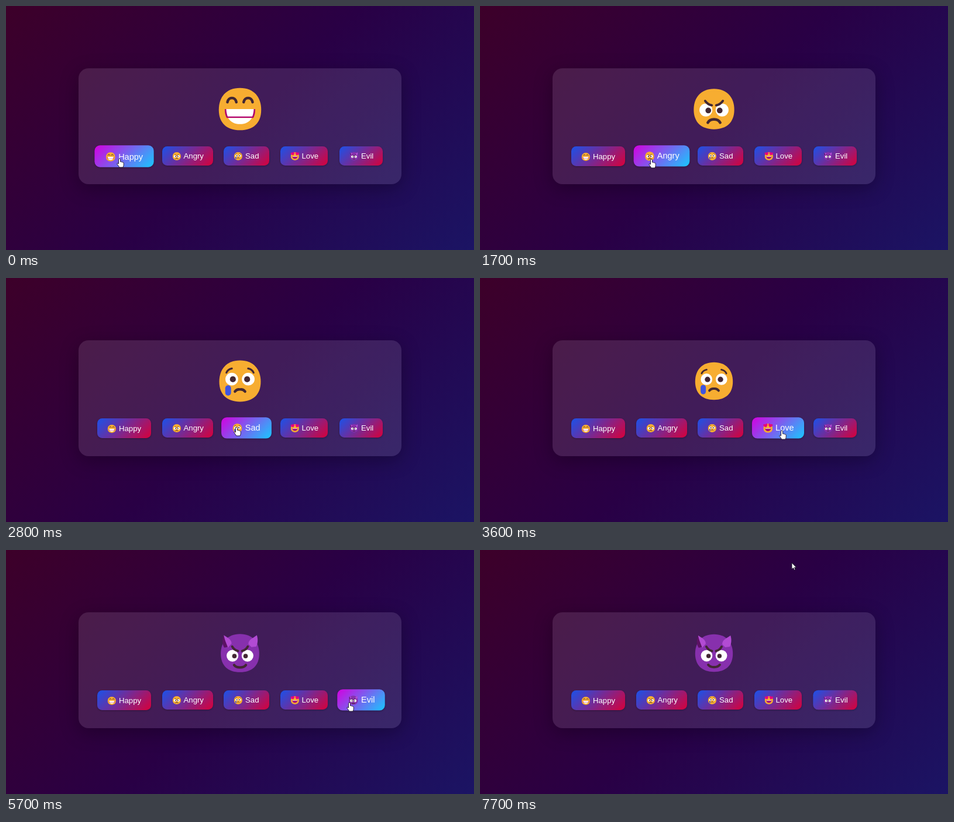
Recreate the animation shown at these times as an HTML page. Size 800 by 419 pixels, loop 7.8 s.

```html
<!DOCTYPE html>
<html lang="en">
<head>
<meta charset="utf-8">
<title>Mood picker</title>
<style>
html, body { margin: 0; width: 100%; height: 100%; overflow: hidden; }
body { position: relative; background: linear-gradient(135deg, #3d0029, #290045 50%, #1b1464); }
.panel { position: absolute; left: 124px; top: 106.5px; width: 552px; height: 199.5px; border-radius: 17px;
  background: rgba(255,255,255,.11); box-shadow: 0 8px 32px rgba(0,0,0,.28); }
.btn { position: absolute; top: 240.5px; height: 33.5px; border-radius: 8.5px;
  background: linear-gradient(135deg, #1a52ea, #d8003a); box-shadow: 0 1px 3px rgba(0,0,0,.3);
  color: #fff; font: 13.2px/33.5px "Liberation Sans", Arial, sans-serif; }
.btn.hot { background: linear-gradient(135deg, #d400e0, #18c8ff); }
.btn svg { position: absolute; left: 17.1px; top: 9.6px; width: 15.75px; height: 15.75px; }
.btn span { position: absolute; left: 37px; top: .5px; white-space: nowrap; }
svg { overflow: visible; }
#face { position: absolute; left: 364px; top: 141.3px; width: 72px; height: 72px; }
#cursor { position: absolute; left: 0; top: 0; width: 1px; height: 1px; }
.line { fill: none; stroke: #422733; stroke-linecap: round; stroke-linejoin: round; }
</style>
</head>
<body>
<svg width="0" height="0" style="position:absolute">
  <defs>
    <path id="head" d="M0-32C21-32 32-18 32 1C32 21 20 32 0 32S-32 21-32 1C-32-18-21-32 0-32Z"/>
    <path id="heart" fill="#e6007e" d="M0 13C-8 7-15 2-15-6C-15-14-4-15 0-8C4-15 15-14 15-6C15 2 8 7 0 13Z"/>
    <g id="Happy">
      <use href="#head" fill="#f7ad31"/>
      <path class="line" stroke-width="4" d="M-19-10.5C-17.5-19-7-19-5.5-10.5M5.5-10.5C7-19 17.5-19 19-10.5"/>
      <path fill="#b1006c" d="M-23 0H23C23 7 21.5 11 20 13.5H-20C-21.5 11-23 7-23 0Z"/>
      <path fill="#fff" d="M-20.8 0H20.8Q20.5 7 18.5 11.3H-18.5Q-20.5 7-20.8 0ZM-18 13.5H18C14 20 8 22.8 0 22.8S-14 20-18 13.5Z"/>
    </g>
    <g id="Angry">
      <use href="#head" fill="#f7ad31"/>
      <g fill="#fff"><circle cx="-12.8" cy="1.5" r="10.2"/><circle cx="12.8" cy="1.5" r="10.2"/></g>
      <g fill="#422733"><circle cx="-9" cy="2.3" r="4.5"/><circle cx="9" cy="2.3" r="4.5"/></g>
      <path class="line" stroke-width="3.6" d="M-14-13Q-10-7-3.5-6M14-13Q10-7 3.5-6"/>
      <path class="line" stroke-width="4.3" d="M-10-1"/>
      <path class="line" stroke-width="4.3" d="M-9.8 21.5C-6 14.5 6 14.5 9.8 21.5"/>
    </g>
    <g id="Sad">
      <use href="#head" fill="#f7ad31"/>
      <g fill="#fff"><circle cx="-12.7" cy="-3" r="9.8"/><circle cx="12.7" cy="-3" r="9.8"/></g>
      <g fill="#422733"><circle cx="-11" cy="-2.8" r="4.6"/><circle cx="11" cy="-2.8" r="4.6"/></g>
      <path class="line" stroke-width="2.8" d="M-21-13Q-18.5-18.5-12.5-19.5M21-13Q18.5-18.5 12.5-19.5"/>
      <path class="line" stroke-width="4" d="M-7.8 16.2C-4.5 12-1 13 0 13S4.500 12 7.800 16.200"/>
      <rect x="-22.8" y="6.500" width="9" height="16" rx="4.500" fill="#3f55e0"/>
    </g>
    <g id="Love">
      <use href="#head" fill="#f7ad31"/>
      <path fill="#a8087a" d="M-20.500 0H20.500C20.500 13 12 21 0 21S-20.500 13-20.500 0Z"/>
      <path fill="#fff" d="M-18.500 0H18.500L18 4H-18Z"/>
      <use href="#heart" transform="translate(-17-18.500) rotate(-15)"/>
      <use href="#heart" transform="translate(17-18.500) rotate(15)"/>
    </g>
    <g id="Evil">
      <use href="#head" fill="#8730ad"/>
      <path fill="#5b1263" d="M-27-30C-30-22-30-15-26-9L-18-11Z"/>
      <path fill="#b24bd3" d="M-27-30C-21-26-14-23-14-16L-20-9C-22-15-25-20-27-30ZM28-30C22-25 14-23 14-15L19-10L27-11C30-17 30-24 28-30Z"/>
      <g fill="#fff"><circle cx="-12.500" cy="4.500" r="9.800"/><circle cx="12.500" cy="4.500" r="9.800"/></g>
      <g fill="#422733"><circle cx="-9.300" cy="5" r="3.700"/><circle cx="9.300" cy="5" r="3.700"/></g>
      <path class="line" stroke-width="3.800" d="M-13-11Q-10-5-3.500-3.500M13-11Q10-5 3.500-3.500"/>
      <path class="line" stroke-width="4.200" d="M-9.800 20C-6 25.300 6 25.300 9.800 20"/>
    </g>
  </defs>
</svg>
<div class="panel"></div>
<svg id="face" viewBox="-36 -36 72 72"><use href="#Happy"/></svg>
<svg id="cursor">
  <g fill="#fff" stroke="#1a1226" stroke-width=".9" stroke-linejoin="round">
    <path id="hand" d="M-1.500 1.300Q-1.300 0 0 0T1.500 1.300V5.500Q2.800 4.900 3.600 6Q5 5.500 5.700 6.600Q7 6.300 7.200 7.800V11Q7.200 12.500 6 15H-.300Q-1.500 12.500-4 9.500Q-4.300 8-3 7.900L-1.500 9Z"/>
    <path id="arrow" d="M0 0V11L2.600 8.700L4.300 12.400L6 11.600L4.400 8H7.700Z"/>
  </g>
</svg>
<script>
const LOOP = 7800, PULSE = 1025, PULSE_START = 3570, FADE = 300;

// label, left, width, hover start, hover end, click time
const moods = [
  ["Happy", 156, 91.5, -1000, 488, 0],
  ["Angry", 266.5, 87, 547, 2083, 1100],
  ["Sad", 372, 78, 2147, 3212, 2500],
  ["Love", 468.5, 81.5, 3259, 4330, 3900],
  ["Evil", 570, 74, 4542, 7544, 5100]
].map(([name, left, width, enter, leave, click]) => ({ name, left, width, enter, leave, click }));

// time, x, y of the pointer tip
const path = [
  [0, 194, 262], [250, 194, 262], [700, 293, 263], [1800, 293, 263], [2300, 394, 256], [3000, 394, 256],
  [3450, 516, 262], [4270, 516, 262], [4440, 553, 303], [4600, 587, 262], [7510, 587, 262], [7700, 533, 22], [LOOP, 533, 22]
];

const $ = id => document.getElementById(id);
const clamp = v => Math.min(1, Math.max(0, v));
const smooth = v => v * v * (3 - 2 * v);

// CSS "ease": cubic-bezier(.25, .1, .25, 1)
function ease(x) {
  if (x <= 0 || x >= 1) return clamp(x);
  const bez = (a, b, s) => 3 * a * s * (1 - s) ** 2 + 3 * b * s * s * (1 - s) + s ** 3;
  let lo = 0, hi = 1;
  for (let i = 0; i < 20; i++) {
    const mid = (lo + hi) / 2;
    if (bez(.25, .25, mid) < x) lo = mid; else hi = mid;
  }
  return bez(.1, 1, lo);
}

for (const m of moods) {
  m.el = document.createElement("div");
  m.el.className = "btn";
  m.el.style.left = m.left + "px";
  m.el.style.width = m.width + "px";
  m.el.innerHTML = `<svg viewBox="-36 -36 72 72"><use href="#${m.name}"/></svg><span>${m.name}</span>`;
  document.body.insertBefore(m.el, $("cursor"));
}

function pointer(t) {
  const i = path.findIndex(p => p[0] > t);
  const [t0, x0, y0] = path[i - 1], [t1, x1, y1] = path[i];
  const k = smooth((t - t0) / (t1 - t0));
  return [x0 + (x1 - x0) * k, y0 + (y1 - y0) * k];
}

let shown = "";
function draw(t) {
  let over = false, mood = "Happy";
  for (const m of moods) {
    const hot = t >= m.enter && t < m.leave;
    const grow = ease((t - m.enter) / FADE) - ease((t - m.leave) / FADE);
    m.el.classList.toggle("hot", hot);
    m.el.style.transform = `scale(${1 + .1 * grow})`;
    over = over || hot;
    if (t >= m.click) mood = m.name;
  }
  if (mood !== shown) $("face").firstElementChild.setAttribute("href", "#" + (shown = mood));

  const phase = ((t - PULSE_START) / PULSE + 10) % 1 * 2;
  const swell = phase < 1 ? ease(phase) : 1 - ease(phase - 1);
  $("face").style.transform = `scale(${1 + .135 * swell})`;

  const [x, y] = pointer(t);
  $("cursor").style.transform = `translate(${x}px, ${y}px)`;
  $("hand").style.display = over ? "" : "none";
  $("arrow").style.display = over ? "none" : "";
}

const start = performance.now();
function tick() {
  draw((performance.now() - start) % LOOP);
  requestAnimationFrame(tick);
}
tick();
</script>
</body>
</html>
```
